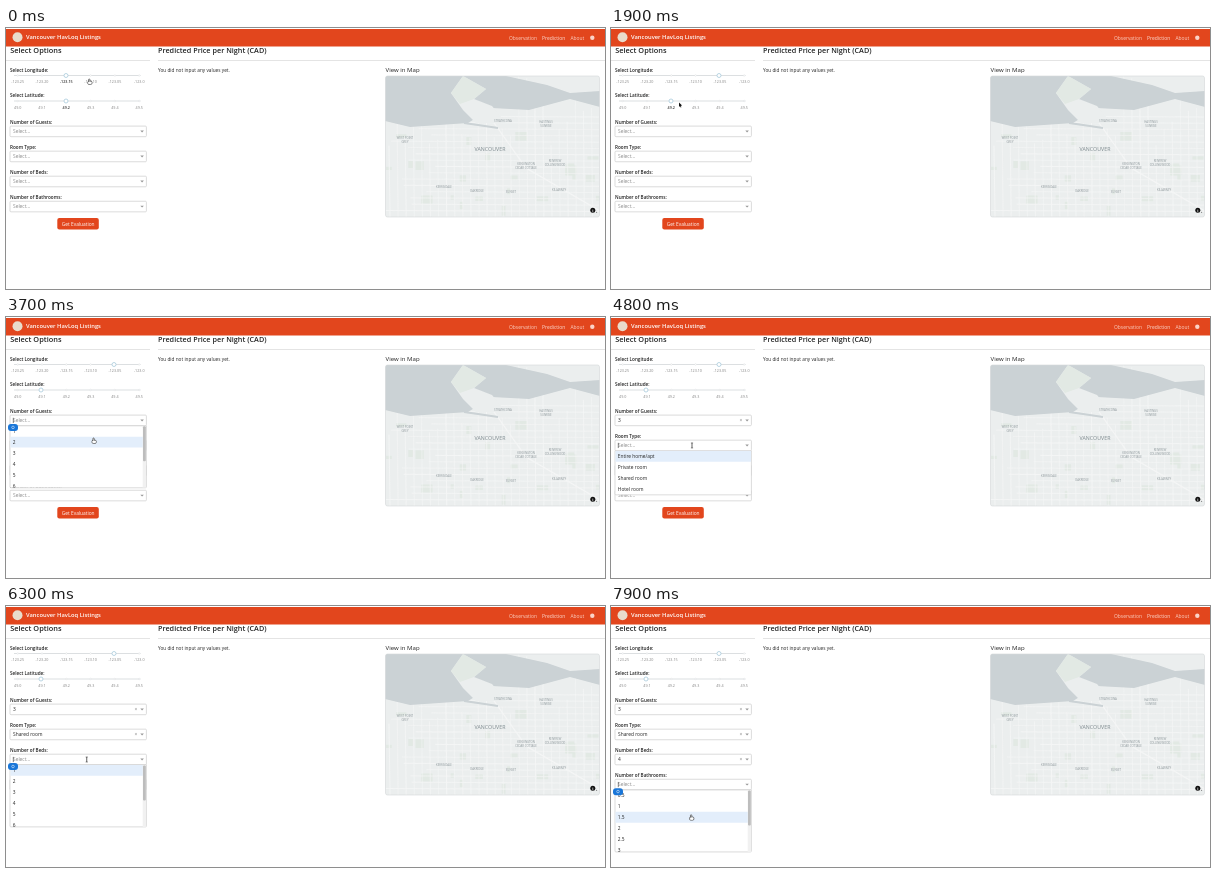
Recreate the animation shown at these times as an HTML page with a canvas. Size 599 by 261 pixels, loop 8000 ms.

```html
<!DOCTYPE html>
<html lang="en">
<head>
<meta charset="utf-8">
<title>Listings dashboard</title>
<style>
html, body { margin: 0; width: 100%; height: 100%; overflow: hidden; background: #fff; }
canvas { display: block; width: 599px; height: 261px; }
</style>
</head>
<body>
<canvas id="stage" width="599" height="261"></canvas>
<script>
const ctx = document.getElementById('stage').getContext('2d');
const LOOP = 8000, STEP = 100, ROW = 10.9;
const RED = '#e2461d', INK = '#222', GREY = '#8a8a8a', BORDER = '#ccc';

const sliders = [
  { label: 'Select Longitude:', y: 47.5, from: 300, to: 1300, end: 108,
    marks: ['-123.25', '-123.20', '-123.15', '-123.10', '-123.05', '-123.0'] },
  { label: 'Select Latitude:', y: 73, from: 2300, to: 2700, end: 35,
    marks: ['49.0', '49.1', '49.2', '49.3', '49.4', '49.5'] }
];

const counts = ['1', '2', '3', '4', '5', '6'];
const fields = [
  { label: 'Number of Guests:', open: 3100, close: 4000, pick: 2, options: counts },
  { label: 'Room Type:', open: 4500, close: 5400, pick: 2,
    options: ['Entire home/apt', 'Private room', 'Shared room', 'Hotel room'] },
  { label: 'Number of Beds:', open: 6100, close: 6600, pick: 3, options: counts },
  { label: 'Number of Bathrooms:', open: 7100, close: LOOP, pick: 2,
    options: ['0.5', '1', '1.5', '2', '2.5', '3'] }
];
fields.forEach((f, i) => {
  f.y = 103.4 + 25.05 * i;
  f.menuTop = f.y + 5.4;
  f.blur = i < 3 ? Math.min(f.close + 500, fields[i + 1].open) : LOOP;
  f.scrolls = f.options.length > 4;
});

// The pointer drags each handle, opens each field, then clicks the chosen option
const path = [
  [0, 83.2, 51], [1900, 68, 74.5], [3700, 87.5, 121], [6900, 84.2, 199],
  ...sliders.flatMap(s => [[s.from, 60, s.y], [s.to, s.end, s.y]]),
  ...fields.flatMap(f => [[f.open, 80, f.y], [f.open + 300, 81, f.y],
    [f.close, 80, f.menuTop + (f.pick + .5) * ROW]])
].sort((a, b) => a[0] - b[0]);

const ease = p => p * p * (3 - 2 * p);
const clamp01 = p => Math.max(0, Math.min(1, p));
const isOpen = (f, t) => t >= f.open && t < f.close;

// Text is laid out large and scaled down so that small sizes keep exact advances
function text(str, x, y, size, color = INK, weight = 400, align = 'left') {
  ctx.save();
  ctx.translate(x, y);
  ctx.scale(.1, .1);
  ctx.font = `${weight} ${size * 10}px "Open Sans", "Noto Sans", sans-serif`;
  ctx.textAlign = align;
  ctx.fillStyle = color;
  ctx.fillText(str, 0, 0);
  ctx.restore();
}

function paint(fill, stroke, width) {
  if (fill) { ctx.fillStyle = fill; ctx.fill(); }
  if (stroke) { ctx.strokeStyle = stroke; ctx.lineWidth = width; ctx.stroke(); }
}

function box(x, y, w, h, r, fill, stroke, width = .7) {
  ctx.beginPath();
  ctx.roundRect(x, y, w, h, r);
  paint(fill, stroke, width);
}

function disc(x, y, r, fill, stroke, width = .8) {
  ctx.beginPath();
  ctx.arc(x, y, r, 0, 7);
  paint(fill, stroke, width);
}

function shape(points, fill, stroke, width) {
  ctx.beginPath();
  for (let i = 0; i < points.length; i += 2) ctx.lineTo(points[i], points[i + 1]);
  paint(fill, stroke, width);
}

const line = (points, color, width) => shape(points, null, color, width);

function randomFrom(seed) {
  return () => (seed = seed * 16807 % 2147483647) / 2147483647;
}

function drawMap() {
  const land = '#ebeeee', road = '#f5f6f6', park = '#e2e9e4', water = '#cbd2d5';
  const random = randomFrom(11);
  ctx.save();
  box(379.5, 48, 214, 141, 2, land);
  ctx.clip();
  for (let i = 0; i < 22; i++) {
    box(380 + random() * 210, 102 + random() * 82, 3 + random() * 9, 3 + random() * 7, 0, park);
  }
  for (let i = 0; i < 27; i++) {
    const x = 383 + i * 8.1, start = 48 + random() * 70;
    line([x, start, x + 1, 189], road, .4 + random() * .6);
  }
  for (let i = 0; i < 17; i++) {
    const y = 88 + i * 6.3, start = 379 + random() * 60;
    line([start, y, 594, y + 1], road, .4 + random() * .6);
  }
  line([486, 92, 520, 140, 594, 183], road, 1.1);
  // Bay and inlet, then the downtown peninsula with its park and creek
  shape([379, 48, 500, 48, 541, 57, 564, 65, 594, 63, 594, 79, 564, 71, 523, 82, 486, 80, 462, 95, 404, 99, 379, 93], water);
  shape([457, 48, 445, 65, 457, 82, 470, 95, 500, 95, 486, 78, 468, 71, 480, 61], land);
  shape([457, 48, 445, 65, 454, 76, 468, 71, 480, 61], park);
  line([458, 95, 472, 97, 492, 100], water, 2);
  const label = (x, y, ...rows) =>
    rows.forEach((row, i) => text(row, x, y + i * 3.8, 2.8, '#8d979b', 400, 'center'));
  label(399, 111, 'WEST POINT', 'GREY');
  label(497, 94, 'STRATHCONA');
  label(540, 95, 'HASTINGS', 'SUNRISE');
  label(520, 137, 'KENSINGTON', 'CEDAR COTTAGE');
  label(549, 134, 'RENFREW', 'COLLINGWOOD');
  label(438, 160, 'KERRISDALE');
  label(471, 164, 'OAKRIDGE');
  label(505, 165, 'SUNSET');
  label(553, 163, 'KILLARNEY');
  text('VANCOUVER', 484, 122.6, 5.3, '#7b878c', 400, 'center');
  ctx.restore();
  box(379.5, 48, 214, 141, 2, null, '#d3d7d8', .6);
  disc(586.8, 182.3, 2.5, '#111');
  text('i', 586.8, 183.8, 4, '#fff', 700, 'center');
  disc(590.6, 184.2, .5, '#555');
}

function drawPage() {
  ctx.fillStyle = '#fff';
  ctx.fillRect(0, 0, 599, 261);
  ctx.fillStyle = RED;
  ctx.fillRect(0, 1, 599, 17.5);
  disc(11.5, 9.2, 5, '#e9dccb');
  text('Vancouver HavLoq Listings', 20, 11.2, 5.8, '#fff', 600);
  text('Observation', 503, 11.5, 4.9, '#fbd3c7');
  text('Prediction', 536, 11.5, 4.95, '#fce0d7');
  text('About', 564.5, 11.5, 4.9, '#fbd3c7');
  disc(586.3, 9.7, 2.2, '#fbd3c7');

  text('Select Options', 4.2, 25.1, 7.4, INK, 600);
  text('Predicted Price per Night (CAD)', 152, 25.1, 7.25, INK, 600);
  line([0, 32.5, 144, 32.5], '#e4e4e4', 1);
  line([152, 32.5, 599, 32.5], '#e4e4e4', 1);
  text('You did not input any values yet.', 152, 43.6, 4.75);
  text('View in Map', 379.6, 44, 6.05);
  drawMap();
  box(51.3, 190, 41.5, 11.6, 2, RED);
  text('Get Evaluation', 72.2, 197.6, 4.85, '#fff', 400, 'center');
}

function drawSlider(s, t) {
  const x = 60 + (s.end - 60) * ease(clamp01((t - s.from) / (s.to - s.from)));
  text(s.label, 4, s.y - 4, 4.65, INK, 600);
  line([8, s.y, 134.5, s.y], '#dcdfe1', 1.2);
  s.marks.forEach((mark, i) => {
    const mx = 11.7 + i * 24.3, active = i === 2 && x === 60;
    disc(mx, s.y, .8, '#fff', '#dcdfe1', .5);
    text(mark, mx, s.y + 7.6, 3.7, active ? '#333' : '#808080', active ? 600 : 400, 'center');
  });
  disc(x, s.y, 2, '#fff', '#a9cbdc', .8);
}

function drawField(f, t) {
  const open = isOpen(f, t), done = t >= f.close;
  const focused = done && t < f.blur;
  text(f.label, 4, f.y - 7.8, 4.65, INK, 600);
  if (focused) box(3.9, f.y - 5.4, 136.6, 10.8, 1.2, null, '#cfe5fb', 1.6);
  box(4, f.y - 5.3, 136.4, 10.6, 1, '#fff', focused ? '#4a9be8' : BORDER);
  text(done ? f.options[f.pick] : 'Select...', 7, f.y + 1.8, 4.85, done ? INK : GREY);
  if (open) line([7.3, f.y - 2.6, 7.3, f.y + 2.6], '#333', .6);
  if (done) text('×', 130, f.y + 1.7, 5, '#888', 400, 'center');
  shape([134.3, f.y - .9, 137.9, f.y - .9, 136.1, f.y + 1], '#999');
}

function drawMenu(f, pointerY) {
  const top = f.menuTop, height = f.scrolls ? 62 : 44;
  const hover = Math.max(0, Math.floor((pointerY - top) / ROW));
  ctx.save();
  box(4, top, 136.4, height, [0, 0, 1, 1], '#fff', BORDER);
  ctx.clip();
  box(4.4, top + hover * ROW, 135.6, ROW, 0, '#e3eefb');
  f.options.forEach((option, i) => text(option, 6.8, top + i * ROW + 7.2, 4.85));
  if (f.scrolls) {
    box(136.7, top, 3.4, height, 0, '#f1f1f1');
    box(137, top + .5, 2.8, 35, 1, '#bdbdbd');
  }
  ctx.restore();
  if (f.scrolls) {
    box(2, f.y + 3.6, 10, 7, 3, '#1976d8');
    disc(7, f.y + 7, 1.3, null, '#fff', .5);
  }
}

function pointerAt(t) {
  const i = path.findLastIndex(stop => stop[0] <= t);
  const [t0, x0, y0] = path[i], [t1, x1, y1] = path[i + 1];
  const p = ease((t - t0) / (t1 - t0));
  return { x: x0 + (x1 - x0) * p, y: y0 + (y1 - y0) * p };
}

function pointerKind({ y }, t) {
  const dragging = sliders.some(s => t > s.from - 400 && t <= s.to);
  const inMenu = fields.some(f => isOpen(f, t) && y > f.menuTop);
  const onButton = y > 190 && y < 202;
  if (dragging || inMenu || onButton) return 'hand';
  return fields.some(f => Math.abs(y - f.y) < 5.3) ? 'beam' : 'arrow';
}

function drawPointer(at, kind) {
  ctx.save();
  ctx.translate(at.x, at.y);
  if (kind === 'beam') {
    line([0, -2.5, 0, 2.5], '#222', .7);
    for (const y of [-2.5, 2.5]) line([-1.1, y, 1.1, y], '#222', .5);
  } else if (kind === 'hand') {
    box(-1.5, 2.2, 4.3, 3.2, 1.2, '#fff', '#222', .6);
    box(-.6, 0, 1.3, 3.6, .6, '#fff', '#222', .6);
    box(-.8, 2.7, 2.8, 2, .5, '#fff');
  } else {
    shape([0, 0, 0, 4.4, 1, 3.5, 1.7, 5.1, 2.4, 4.8, 1.8, 3.2, 3.1, 3.1], '#111');
  }
  ctx.restore();
}

function frame(now) {
  const t = Math.floor(now % LOOP / STEP) * STEP;
  const at = pointerAt(t);
  drawPage();
  sliders.forEach(s => drawSlider(s, t));
  fields.forEach(f => drawField(f, t));
  fields.filter(f => isOpen(f, t)).forEach(f => drawMenu(f, at.y));
  drawPointer(at, pointerKind(at, t));
  requestAnimationFrame(frame);
}
requestAnimationFrame(frame);
</script>
</body>
</html>
```
